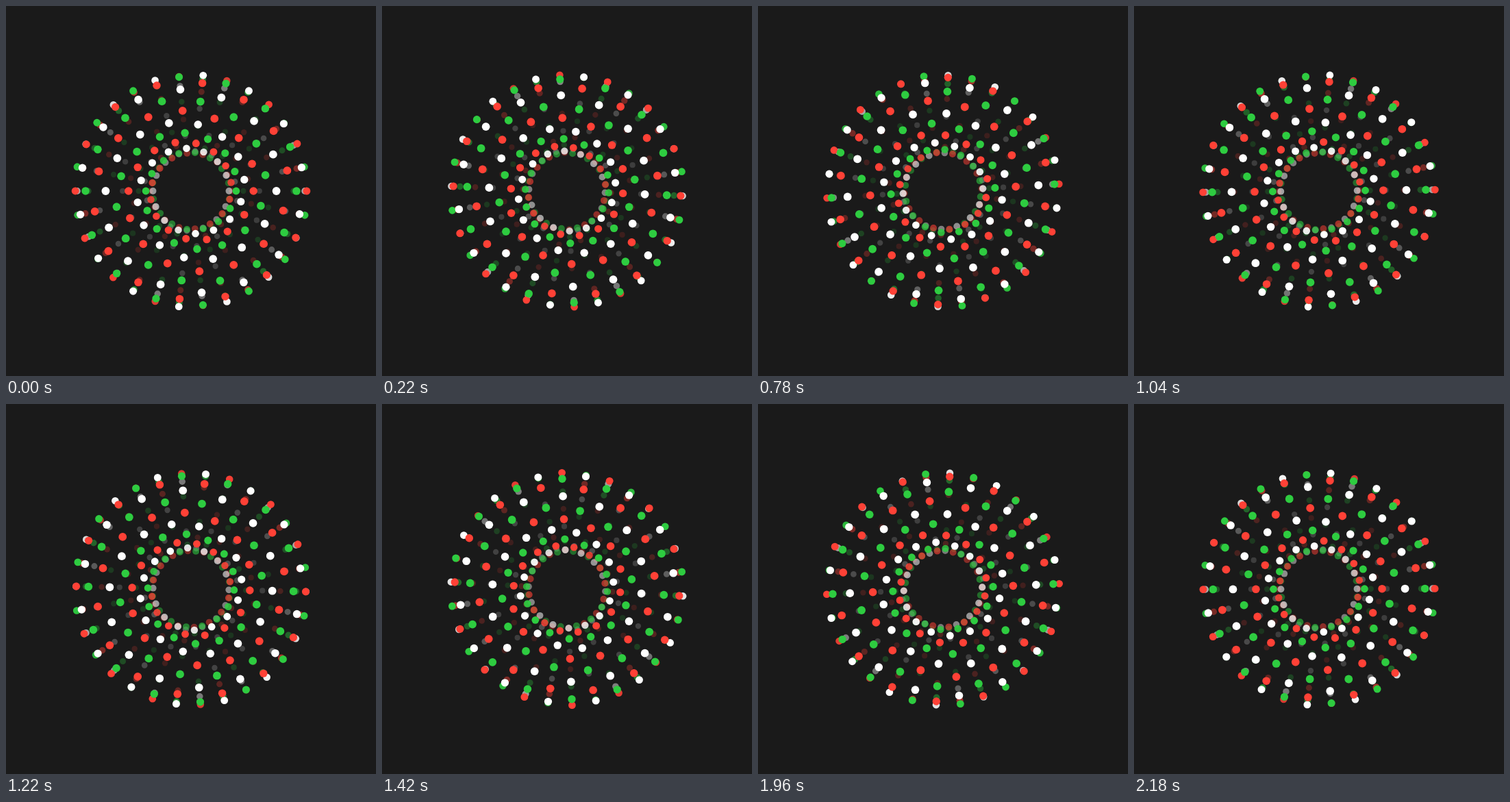
An HTML page with a canvas that plays this animation: 540 by 540 pixels, repeating every 2200 ms.

```html
<!DOCTYPE html>
<html lang="en">
<head>
<meta charset="utf-8">
<title>Dotted torus</title>
<style>
html, body { margin: 0; height: 100%; overflow: hidden; background: #1a1a1a; }
canvas { display: block; }
</style>
</head>
<body>
<canvas id="stage" width="540" height="540"></canvas>
<script>
const ctx = document.getElementById('stage').getContext('2d');
const COLORS = ['#ffffff', '#ff4136', '#2ecc40'];
const SPOKES = 30, DOTS = 12, TURNS = 4;
const RING = 110.5, TUBE = 54.7, DEPTH = 0.135; // radii in px, perspective strength
const PHASE = 2.8 * Math.PI / 180;
const STEP = 1100; // ms to travel one spoke along the spiral
const TAU = Math.PI * 2;

function dotAt(spoke, m, shift) {
  const theta = (spoke + shift) / SPOKES * TAU;
  const phi = PHASE + TURNS * theta + m / DOTS * TAU;
  const z = Math.sin(phi);
  const r = (RING + TUBE * Math.cos(phi)) / (1 - DEPTH * z);
  return {
    x: 270 + r * Math.cos(theta),
    y: 270 + r * Math.sin(theta),
    z,
    color: COLORS[m % 3]
  };
}

function draw(now) {
  const shift = now % (2 * STEP) / STEP;
  const dots = [];
  for (let k = 0; k < SPOKES; k++)
    for (let m = 0; m < DOTS; m++) dots.push(dotAt(k, m, shift));
  dots.sort((a, b) => a.z - b.z);

  ctx.globalAlpha = 1;
  ctx.fillStyle = '#1a1a1a';
  ctx.fillRect(0, 0, 540, 540);
  for (const d of dots) {
    ctx.globalAlpha = Math.min(1, 0.6 * Math.exp(1.35 * d.z));
    ctx.fillStyle = d.color;
    ctx.beginPath();
    ctx.arc(d.x, d.y, 5 + 0.9 * d.z, 0, TAU);
    ctx.fill();
  }
}

const start = performance.now();
function frame() {
  draw(performance.now() - start);
  requestAnimationFrame(frame);
}
frame();
</script>
</body>
</html>
```
